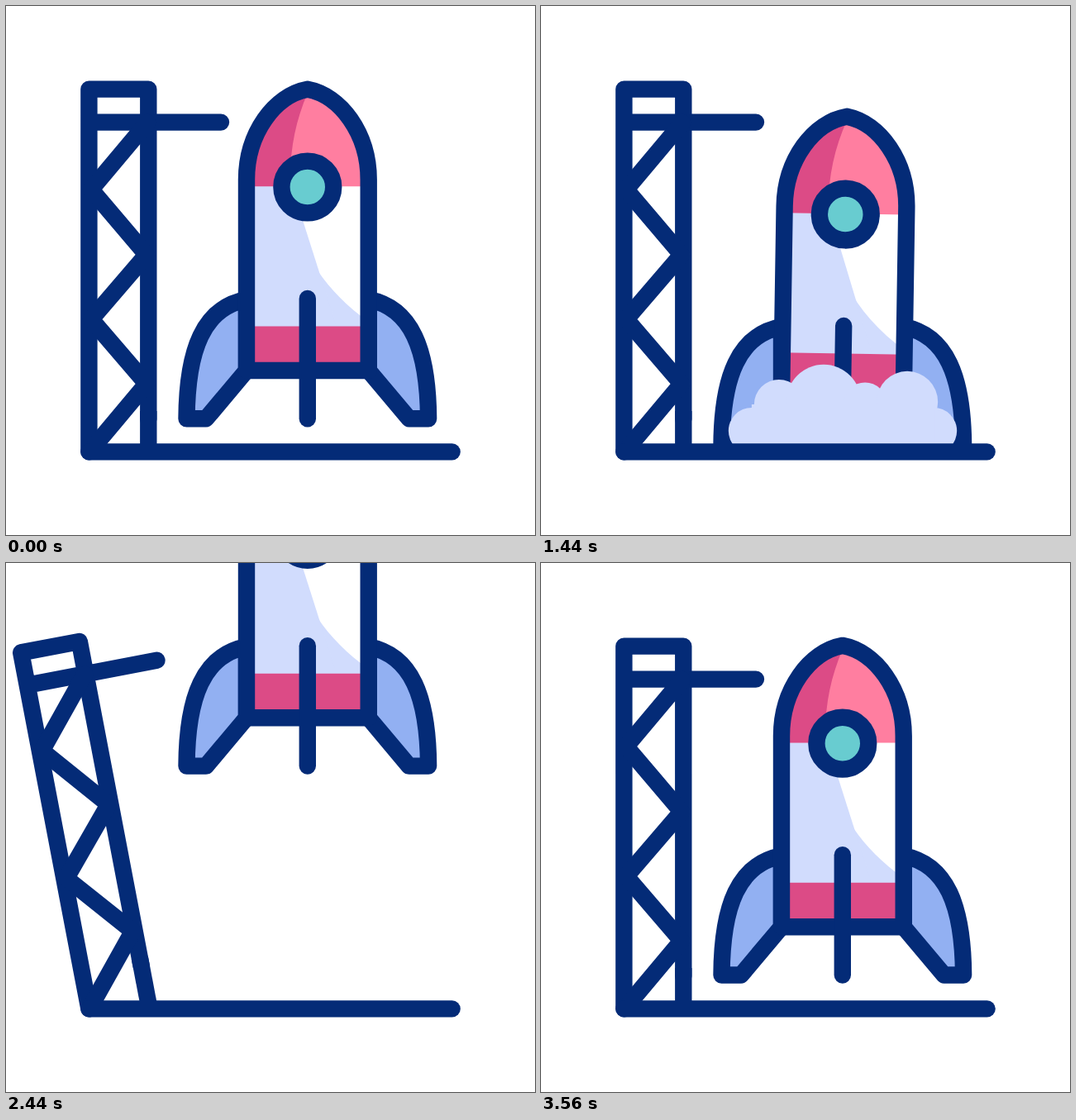
An HTML page that plays this animation: 640 px wide and 640 px high, repeating every 3600 ms.

```html
<!DOCTYPE html>
<html lang="en">
<head>
<meta charset="utf-8">
<title>Rocket launch</title>
<style>
  html, body { margin: 0; width: 100%; height: 100%; overflow: hidden; background: #fff; }
  svg { display: block; width: 100vw; height: 100vh; }
  .line { fill: none; stroke: #042b77; stroke-width: 20.4; stroke-linecap: round; stroke-linejoin: round; }
</style>
</head>
<body>
<svg viewBox="0 0 640 640">
  <defs>
    <path id="hull" d="M291 441V210C291 154 325 108 364.8 100.7C404.600 108 438.700 154 438.700 210V441Z"/>
    <clipPath id="inside"><use href="#hull"/></clipPath>
    <path id="fin" class="line" style="fill:#92b0f2" d="M291 355C239 365 219 415 218.500 499.300H242L291 441Z"/>
  </defs>

  <g id="rocket">
    <use href="#fin"/>
    <use href="#fin" transform="translate(729.6) scale(-1 1)"/>
    <g id="body">
      <g clip-path="url(#inside)">
        <path fill="#fff" d="M280 90H450V450H280Z"/>
        <path fill="#ff7ea0" d="M280 90H450V218.300H280Z"/>
        <path id="shade" fill="#d1dcfd" d="M365 105C325 190 334 310 440 383V388H280V218.300H345V105Z"/>
        <path fill="#d1dcfd" d="M280 218.300H346L400 388H280Z"/>
        <path fill="#dc4b86" d="M365 105C349 142 342.500 180 344.500 218.300H280V105Z"/>
        <path fill="#dc4b86" d="M280 387.500H450V450H280Z"/>
      </g>
      <use href="#hull" class="line"/>
      <circle class="line" style="fill:#68ccd0" cx="364.8" cy="219" r="31.400"/>
      <path class="line" d="M364.800 354V499.300"/>
    </g>
  </g>

  <g id="smoke" fill="#d1dcfd">
    <circle cx="255" cy="514" r="28"/>
    <circle cx="288" cy="482" r="30"/>
    <circle cx="342" cy="479" r="45"/>
    <circle cx="392" cy="481" r="25.500"/>
    <circle cx="443" cy="479" r="37"/>
    <circle cx="475" cy="514" r="28"/>
    <path d="M255 482H475V542H255Z"/>
  </g>

  <g id="tower" class="line">
    <path d="M100.400 539.400V100.600H172.300V500M100.400 140.600H260"/>
    <path stroke-linecap="butt" d="M172.300 490V548"/>
    <path d="M171 141L103 222L170 301L103 379L170 457L103 537"/>
  </g>
  <path class="line" d="M100.400 539.400H539.600"/>
</svg>
<script>
const LOOP = 3600, SINK = 33, PEAK = -590;
const [rocket, body, smoke, tower, shade] =
  ['rocket', 'body', 'smoke', 'tower', 'shade'].map(id => document.getElementById(id));

// The shade on the hull keeps to the white section only.
shade.setAttribute('d', 'M345 218.300C346 275 372 335 440 383V388H280V218.300Z');

const progress = (t, start, end) => Math.min(1, Math.max(0, (t - start) / (end - start)));
const smooth = p => p * p * (3 - 2 * p);

// Cubic bezier easing (1/6, 1/6, 2/3, 1): brisk start, soft landing.
function easeOut(x) {
  let lo = 0, hi = 1;
  for (let i = 0; i < 24; i++) {
    const u = (lo + hi) / 2;
    if (u * (0.5 + u * (1 - 0.5 * u)) < x) lo = u; else hi = u;
  }
  return lo * (0.5 + lo * (2 - 1.5 * lo));
}
const easeIn = x => 1 - easeOut(1 - x);

function height(t) {
  if (t < 1971) return SINK * smooth(progress(t, 0, 600));
  if (t < 2780) return SINK + (PEAK - SINK) * easeIn(progress(t, 1971, 2780));
  return PEAK * (1 - easeOut(progress(t, 2780, 3580)));
}

function draw(t) {
  const shake = t > 140 && t < 1940 ? -0.9 * Math.sin((t - 740) / 200 * Math.PI) : 0;
  const tilt = -10.8 * (smooth(progress(t, 1580, 2180)) - smooth(progress(t, 3200, 3565)));
  const size = Math.max(0, (t - 127) * 0.000762);

  rocket.setAttribute('transform', `translate(0 ${height(t)})`);
  body.setAttribute('transform', `rotate(${shake} 364.8 441)`);
  smoke.setAttribute('transform', `translate(365 545) scale(${size}) translate(-365 -545)`);
  smoke.setAttribute('opacity', 1 - progress(t, 1700, 2160));
  tower.setAttribute('transform', `rotate(${tilt} 100.4 539.4)`);
}

const begin = performance.now();
function tick() {
  draw((performance.now() - begin) % LOOP);
  requestAnimationFrame(tick);
}
tick();
</script>
</body>
</html>
```
